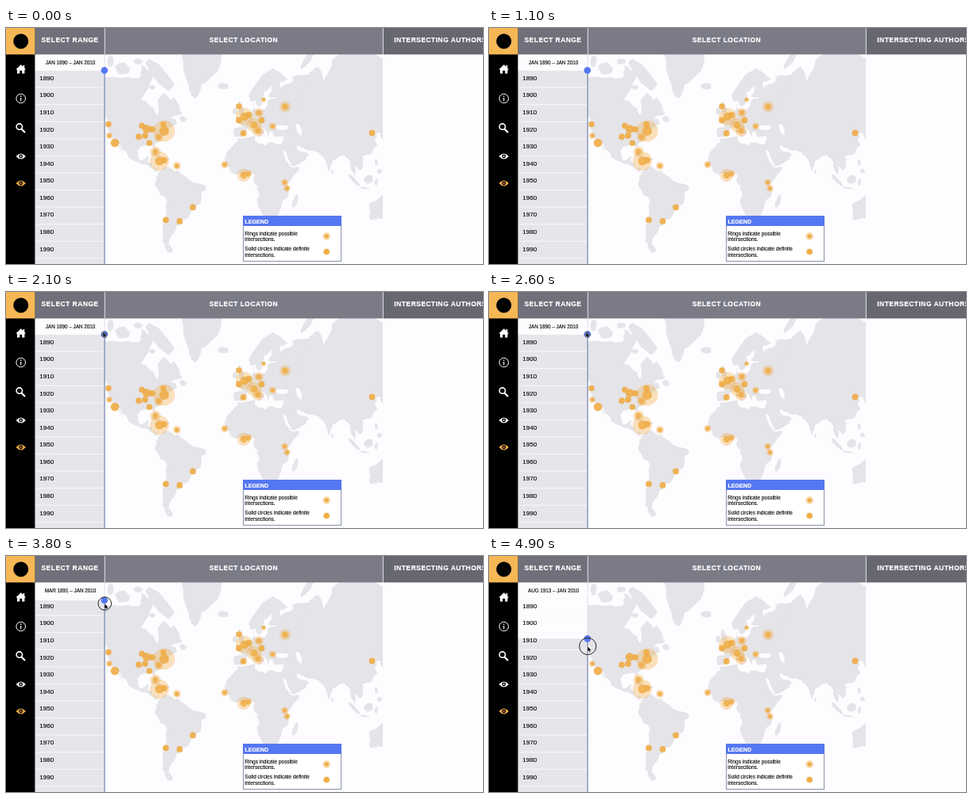
An HTML page that plays this animation: 600 by 298 pixels, repeating every 5000 ms.

```html
<!DOCTYPE html>
<html lang="en">
<head>
<meta charset="utf-8">
<title>Range and location map</title>
<style>
  html, body { margin: 0; width: 100%; height: 100%; overflow: hidden; background: #fdfcfe; }
  svg { display: block; width: 100vw; height: 100vh; font-family: "Liberation Sans", Arial, sans-serif; }
  text { stroke: #000; stroke-width: .12px; }
  .head { font-weight: bold; font-size: 8.5px; letter-spacing: .45px; }
  .head text, .title { fill: #fff; stroke: #fff; stroke-width: .2px; }
  .small { font-size: 6.5px; }
  .year { font-size: 8px; }
</style>
</head>
<body>
<svg viewBox="0 0 600 298" preserveAspectRatio="none">
  <defs>
    <clipPath id="frame"><path d="M124 33H474V298H124z"/></clipPath>
    <g id="eye">
      <path d="M12.5 162Q18.7 154.8 24.9 162Q18.7 169.2 12.5 162z"/>
      <circle cx="18.7" cy="162" r="2.4" fill="#000"/>
      <circle cx="18.7" cy="162" r="1"/>
    </g>
  </defs>
  <rect width="600" height="298" fill="#fdfcfe"/>

  <g clip-path="url(#frame)">
    <g id="land" fill="#e5e4e8"></g>
    <g id="water" fill="#fdfcfe"></g>
  </g>
  <g id="rings" fill="#f2b04a"></g>
  <g id="solids" fill="#efad48"></g>

  <rect id="span" x="36" width="88" fill="#e6e5ea"/>
  <g id="rows"></g>
  <text id="label" x="81" y="46.4" font-size="6.3" text-anchor="middle"></text>
  <path d="M124 33V298" stroke="#d4d5dd" stroke-width=".7"/>
  <path id="bar" stroke="#6479a8"/>

  <rect x="36" width="88" height="33.4" fill="#6f707b"/>
  <rect x="124" width="350" height="33.4" fill="#7a7b87"/>
  <rect x="474" width="126" height="33.4" fill="#66676f"/>
  <path d="M124.3 0V33.4M474.3 0V33.4" stroke="#e4e4ea"/>
  <g class="head">
    <text x="44.5" y="18.2">SELECT RANGE</text>
    <text x="255.7" y="18.2">SELECT LOCATION</text>
    <text x="488.3" y="18.2">INTERSECTING AUTHORS</text>
  </g>

  <rect width="36.4" height="298"/>
  <rect width="36.4" height="33.4" fill="#f6b757"/>
  <circle cx="18.7" cy="16.8" r="9.5"/>
  <g fill="#fff">
    <path d="M12.4 52.5L18.7 46.2L21.6 48.8V47H23.2V50.5L25 52.5H23.4V57.6H20.2V53.8H17.2V57.6H14V52.5z"/>
    <g fill="none" stroke="#fff">
      <circle cx="18.7" cy="89" r="5.8"/>
      <path d="M18.7 85.6V87M18.7 88V92.3" stroke-width="1.2"/>
      <circle cx="16.8" cy="124.6" r="3.7" stroke-width="1.6"/>
      <path d="M19.5 127.5L24 132" stroke-width="2.2"/>
    </g>
    <use href="#eye"/>
  </g>
  <use href="#eye" y="34" fill="#f2ae45"/>

  <rect x="298.5" y="237.5" width="123" height="57" fill="#fff" stroke="#8790ad"/>
  <rect x="298" y="237" width="124" height="13" fill="#5577f1"/>
  <text class="title" x="300.5" y="246.6" font-size="7.1" font-weight="bold">LEGEND</text>
  <g class="small">
    <text x="300.3" y="261.7">Rings indicate possible</text>
    <text x="300.3" y="269.2">intersections.</text>
    <text x="300.3" y="281.4">Solid circles indicate definite</text>
    <text x="300.3" y="288.9">intersections.</text>
  </g>
  <g fill="#efad48">
    <circle cx="403.2" cy="263" r="5" opacity=".4"/>
    <circle cx="403.2" cy="263" r="2.8"/>
    <circle cx="403.2" cy="282.6" r="3.8"/>
  </g>

  <circle id="handle" cx="123.8" r="4.3"/>
  <circle id="press" cx="124.2" fill="none" stroke="#222"/>
  <path id="cursor" d="M0 0V7L1.6 5.6L2.7 8L3.9 7.5L2.8 5.2H5z" stroke="#fff" stroke-width=".4"/>
</svg>

<script>
const $ = id => document.getElementById(id);
const set = (el, attrs) => { for (const k in attrs) el.setAttribute(k, attrs[k]); };
const add = (id, tag, attrs, text = '') => {
  const el = document.createElementNS('http://www.w3.org/2000/svg', tag);
  set(el, attrs);
  el.textContent = text;
  $(id).append(el);
  return el;
};
const groups = (text, n) => {
  const v = text.trim().split(/\s+/).map(Number), out = [];
  while (v.length) out.push(v.splice(0, n));
  return out;
};
const clamp = v => Math.min(1, Math.max(0, v));
const mix = (a, b, k) => a + (b - a) * k;

let seed = 7;
const random = () => (seed = seed * 16807 % 2147483647) / 2147483647;

// Mercator projection
const project = ([lon, lat]) => [
  299.3 + 1.375 * lon,
  192 - 78.8 * Math.asinh(Math.tan(lat * Math.PI / 180))
];

// Break each edge at a randomly shifted midpoint, for a ragged coast
const roughen = pts => pts.flatMap((a, i) => {
  const b = pts[(i + 1) % pts.length];
  const amp = Math.min(1.6, Math.hypot(b[0] - a[0], b[1] - a[1]) * .22);
  return [a, a.map((v, j) => (v + b[j]) / 2 + (random() * 2 - 1) * amp)];
});

// Coastlines: longitude, latitude of the main capes and bays
[
  // North America
  `-135 69 -115 68 -96 68 -94 72 -82 69.5 -86 66 -94.5 59 -82.3 55 -79 51.3 -78 60 -73.5 62.3
   -66 58.8 -64.5 60.3 -56 52 -66 50 -69 48.3 -64.5 49 -61 45.8 -66 43.7 -70.5 42 -75.7 37
   -81 31.5 -80.3 25.5 -84 30 -94.5 29.4 -97.6 26 -95.5 18.5 -91 18.8 -87 21.4 -88.5 16
   -84 15.8 -83.5 11 -78 9.3 -80.5 7.5 -87.5 13 -96 15.8 -105.5 20.3 -112.5 30 -114.5 31.5
   -110 23 -117.2 33 -122.5 37.5 -124.6 48.4 -135 58`,
  // South America
  `-77.5 8 -72 12 -60 8.5 -50 0 -35 -5.5 -39 -13 -41 -22 -48.5 -26 -53.5 -34 -58 -34.3 -57 -37
   -62 -39 -67 -46 -69 -51 -65.3 -54.8 -70 -55 -75 -49 -73.5 -37 -70.3 -19 -76 -14 -81.2 -5 -80 0`,
  // Greenland
  '-72 78 -58 75.5 -54 69 -48 61 -43.5 60 -39 65.5 -24 70 -18 78',
  // Europe
  `-9 37 -8.9 43.2 -1.6 43.4 -4.6 48.3 8 53.7 9 57.5 10.5 54.3 19 54.5 23 59 30 60 34 64.5
   44 66.5 44 68.4 61 69 61 36 27.5 36.7 26.5 40.5 23 40.5 22.5 36.7 19 42 13.5 45.5 18.5 40.2
   16 38 10.5 43 3.2 43.2 -.5 39 -2 36.8`,
  // Scandinavia
  `35 64 30 60 22 60.5 25 65 17.5 62 16.5 57 13 55.4 10.8 59 5.5 58.5 5 62 14 67.5 26 71
   41 67.5 33 66.7`,
  // Asia
  `59 69 68 71.5 73 67 81 73.5 104 77.5 135 72 135 44 127.5 39.5 129 36 126.5 34.5 125 39.5
   118 39 122 37.2 119.3 35 122 31 117 23.7 108 21.6 109.2 12 105 8.7 101 13.4 103.5 1.5 98.5 9
   97.5 16.5 91.8 22.5 87 21.3 80.2 15 77.5 8 72.8 20 67 24.8 57 26.7 48 30 51.5 25.5 59.8 22.5
   52 15.6 43.3 12.8 35 28 36 36.8`,
  // Africa
  `-6 35.8 10 37.3 10 34 19 30.3 22 32.7 34 31 37.3 21 43.2 11.7 51.2 11.8 39.5 -4 40.5 -15
   35 -20 32 -29 26 -34 19 -34.5 11.8 -17.5 13.7 -11 9 -1 9.5 4 4 6.4 -7.5 4.3 -13 9 -17 14.7
   -16.5 21 -10 30`,
  // Australia
  '114 -22 115.5 -34 124 -33 135 -33 135 -12 126 -14'
].forEach(coast => {
  const points = roughen(roughen(groups(coast, 2).map(project)));
  add('land', 'polygon', { points: points.map(p => p.map(v => v.toFixed(1))).join(' ') });
});

// Ragged ellipses: longitude, latitude, half width, half height, tilt
const blobs = (id, list) => groups(list, 5).forEach(([lon, lat, rx, ry, tilt]) => {
  const ring = Array.from({ length: 9 }, (_, i) => {
    const a = i / 9 * 2 * Math.PI, r = .85 + random() * .3;
    return [rx * r * Math.cos(a), ry * r * Math.sin(a)];
  });
  add(id, 'polygon', {
    points: ring.join(' '),
    transform: `translate(${project([lon, lat])}) rotate(${tilt})`
  });
});
blobs('land', `-76 68.7 24 8 48 -111 71 9 8 0 -122 73 4 7 0 -97 73 6 4 0 -84 64.5 4 3 0
  -56 48.7 4.5 4 30 -19 65 7 4.3 0 58 73.5 4 14 35 -79.5 21.7 8 1.3 18 -71 18.9 4.3 1.6 0
  -2.8 54.3 3.2 10.5 -15 -8 53.3 3 4.2 0 9 40.8 1 3 0 14 37.5 2 1.2 0 46.8 -19 3 9.5 18
  80.7 7.6 1.4 2.2 0 121 16 2 4 0 124 8 3 3 0 114 .7 5.5 6 30 100.8 -.3 10.5 2.3 45
  110 -7.3 6.5 1.2 7 121 -2 2 5 10`);
blobs('water', '34.5 43.3 9 3 0 50.5 42 3 8 -15');

const dot = (id, cx, cy, r, opacity) => add(id, 'circle', { cx, cy, r, opacity });
const solids = (list, r) => groups(list, 2).map(([x, y]) => dot('solids', x, y, r, .92));

// Possible places: x, y, ring radius; the core grows with the ring
groups(`130 136 4 199 130 13.5 192 138 6 188 156 6.6 193 168 12 215 174 5 275 172.5 4.7
  299 186 8.3 305 184 4.6 350.5 195 4.4 353.5 202.5 4.4 300 112 11 318 107 6 312 122.5 9
  317 130 7 324 90.5 3 335.5 124 4.6 351 99.5 7`, 3).forEach(([x, y, r]) => {
  dot('rings', x, y, r, .36);
  dot('solids', x, y, 1.2 + .36 * r, .88);
});
solids('137 145 177 127.5', 5.3);
solids(`167 137.3 175 136 184 128 198 122 199 167 235 226.5 201 242.3 218.5 244 293 116.5
  298.7 133 305 110 321.5 116.5 460.5 132.5`, 3.9);
const early = solids('129 121.5 171 123.5 180.4 145.2 293 99', 3.8);

const decade = 21.58, top0 = 53.5;
for (let i = 0; i < 12; i++) {
  const y = top0 + i * decade;
  add('rows', 'path', { d: `M37 ${y}H124`, stroke: '#f8f8fa' });
  add('rows', 'text', { x: 42.3, y: y + 12.3, class: 'year' }, 1890 + i * 10);
}

const months = 'JAN FEB MAR APR MAY JUN JUL AUG SEP OCT NOV DEC'.split(' ');
const dragStart = 3626;
const ease = (t, from, to) => {
  const k = clamp((t - from) / (to - from));
  return k * (2 - k);
};

function draw(now) {
  const t = Math.floor(now % 5000 / 100) * 100;
  const month = Math.round(283 * clamp((t - dragStart) / 1274) ** 1.5);
  const y = top0 + month / 120 * decade;

  // The pointer enters, hovers over the handle, then drags it down
  const enter = ease(t, 1300, 2000), settle = ease(t, 2600, 3100);
  const px = mix(mix(137, 122, enter), 124, settle);
  const py = y + mix(mix(53.5, -3, enter), 1.5, settle) + 8.1 * clamp((t - dragStart) / 550);

  $('label').textContent = `${months[month % 12]} ${1890 + Math.floor(month / 12)} – JAN 2010`;
  set($('span'), { y, height: 298 - y });
  set($('bar'), { d: `M124 ${y}V298` });
  set($('handle'), { cy: y, fill: t >= 1900 && t < 2900 ? '#4a62b4' : '#5577f1' });
  set($('cursor'), { transform: `translate(${px} ${py})`, opacity: +(t >= 1300) });
  set($('press'), { cy: py, r: mix(7.5, 10.6, clamp((t - 3400) / 1500)), opacity: +(t >= 3500) });
  early.forEach(el => set(el, { opacity: t < 4600 ? .92 : 0 }));
  requestAnimationFrame(draw);
}
requestAnimationFrame(draw);
</script>
</body>
</html>
```
